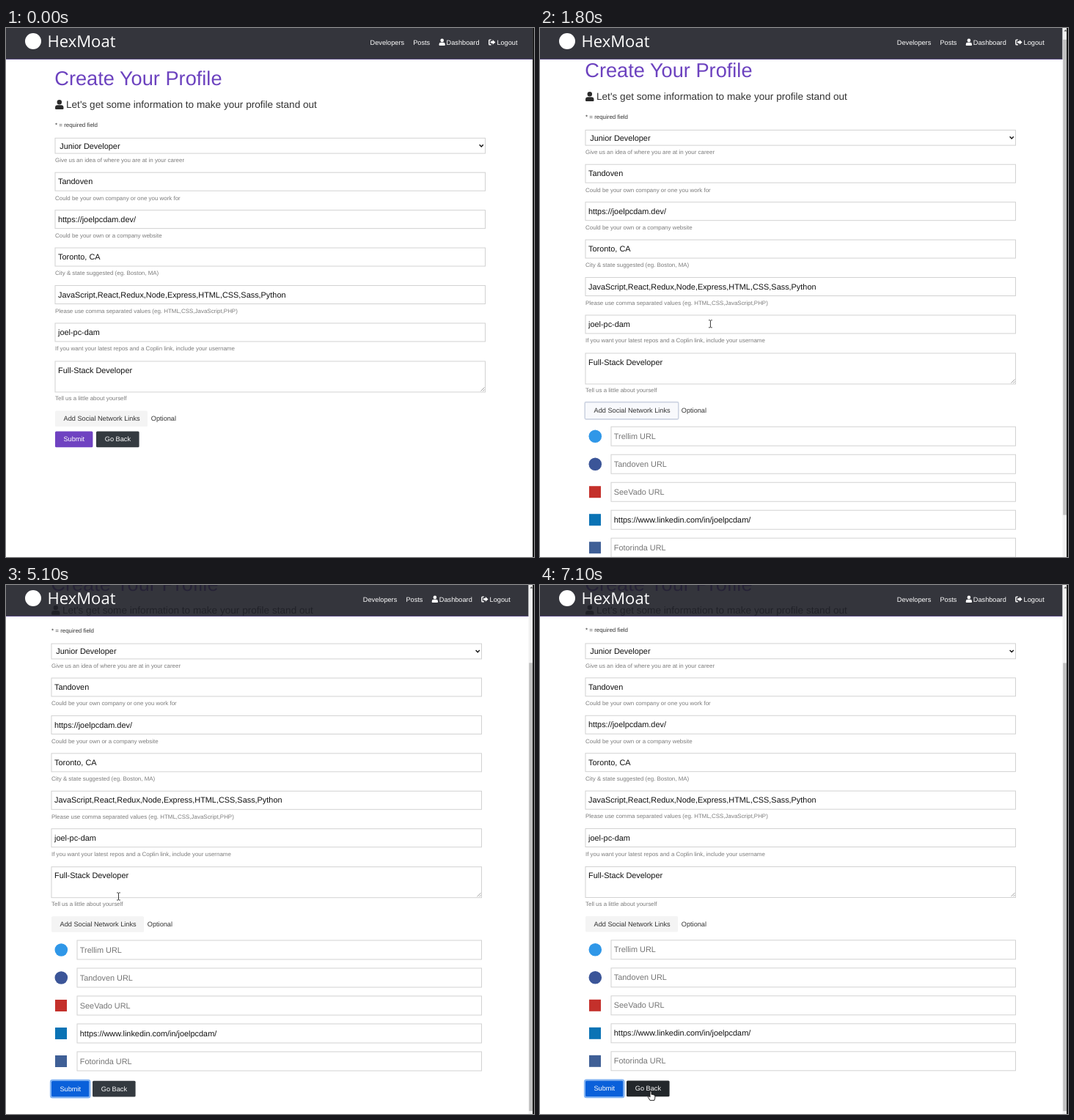
These frames come from a looping animation (720 px wide and 722 px high, 7.2 s). An HTML page:

```html
<!DOCTYPE html>
<html lang="en">
<head>
<meta charset="utf-8">
<title>Create Your Profile</title>
<style>
  html, body { margin: 0; width: 100%; height: 100%; overflow: hidden; background: #fff; }
  svg { display: block; font-family: "Liberation Sans", Arial, sans-serif; text-rendering: geometricPrecision; }
</style>
</head>
<body>
<svg id="stage" width="720" height="722" viewBox="0 0 720 722"></svg>
<script>
const LOOP = 7200, STEP = 100;
const ALERT_H = 48.2, LINKS_H = 196.4;
const VIEW_H = 722, PAGE_H = 792.4, TRACK_H = 712;

const text = (x, y, size, fill, str, extra = '') =>
  `<text x="${x}" y="${y}" font-size="${size}" fill="${fill}" ${extra}>${str}</text>`;
const rect = (x, y, w, h, fill, extra = '') =>
  `<rect x="${x}" y="${y}" width="${w}" height="${h}" fill="${fill}" ${extra}/>`;
const box = (x, y, w, h) => rect(x, y, w, h, '#fff', 'stroke="#d2d2d2"');
const hint = (y, str) => text(67, y, 7.95, '#7c7c7c', str);
const value = (x, y, str) => text(x, y, 10.9, '#111', str);
const icon = (x, y, scale, fill, d) =>
  `<path transform="translate(${x} ${y}) scale(${scale})" fill="${fill}" d="${d}"/>`;

const USER = 'M5.8 0a3.2 3.2 0 1 1 0 6.5a3.2 3.2 0 1 1 0-6.5zM3.4 7.3h4.7a3.4 3.4 0 0 1 3.4 3.4v1.1a1.2 1.2 0 0 1-1.2 1.2H1.2A1.2 1.2 0 0 1 0 11.8v-1.1a3.4 3.4 0 0 1 3.4-3.4z';
const EXIT = 'M3.6 0H1.5A1.5 1.5 0 0 0 0 1.5v5A1.5 1.5 0 0 0 1.5 8h2.1V6.6H1.5V1.4h2.1zM5.6.6v2H2.8v2.8h2.8v2L9.4 4z';

const fields = [
  ['Tandoven', 'Could be your own company or one you work for'],
  ['https://joelpcdam.dev/', 'Could be your own or a company website'],
  ['Toronto, CA', 'City &amp; state suggested (eg. Boston, MA)'],
  ['JavaScript,React,Redux,Node,Express,HTML,CSS,Sass,Python',
    'Please use comma separated values (eg. HTML,CSS,JavaScript,PHP)'],
  ['joel-pc-dam', 'If you want your latest repos and a Coplin link, include your username']
];

// label, badge colour, round badge, filled in
const links = [
  ['Trellim URL', '#2f97e8', true],
  ['Tandoven URL', '#3b5598', true],
  ['SeeVado URL', '#c4302b', false],
  ['https://www.linkedin.com/in/joelpcdam/', '#0a73b5', false, true],
  ['Fotorinda URL', '#3f5f96', false]
];

function fieldRow([val, note], i) {
  const mid = 209.7 + i * 51.43;
  return box(67, mid - 12.5, 586.5, 25) + value(71, mid + 3.7, val) + hint(mid + 24.9, note);
}

function linkRow([label, color, round, filled], i) {
  const mid = 568.2 + i * 38;
  const badge = round
    ? `<circle cx="80.3" cy="${mid}" r="8.8" fill="${color}"/>`
    : rect(72, mid - 8, 16, 16, color);
  return badge + box(102, mid - 13, 551.5, 26) +
    text(105.8, mid + 3.7, 10.9, filled ? '#111' : '#757575', label);
}

const form =
  `<g id="alert">${rect(67.3, 13.9, 586.4, 29, '#40ae5a', 'rx="1"')}` +
    `${text(75, 31.9, 9.1, '#fff', 'Profile Updated')}</g>` +
  text(66.3, 78.3, 27.2, '#6c42bf', 'Create Your Profile') +
  icon(67, 98, 1, '#2b2b2b', USER) +
  text(82, 109.3, 13.6, '#333', "Let's get some information to make your profile stand out") +
  text(67, 134.8, 7.95, '#333', '* = required field') +
  box(67, 150.3, 586.5, 20.8) + value(73.2, 164.5, 'Junior Developer') +
  '<path d="M645.6 159.3l2.6 2.6 2.6-2.6" fill="none" stroke="#111" stroke-width="1.4"/>' +
  hint(183.3, 'Give us an idea of where you are at in your career') +
  fields.map(fieldRow).join('') +
  box(67, 454.9, 586.5, 42) + value(71, 470.6, 'Full-Stack Developer') +
  '<path d="M647.5 495.5l5-5m-2 5l2-2" stroke="#888" stroke-width=".8"/>' +
  hint(508.4, 'Tell us a little about yourself') +
  '<rect id="add" rx="1.5" stroke-width="1.6"/>' +
  text(78.5, 536.2, 9.2, '#333', 'Add Social Network Links') +
  text(197.8, 536.2, 9.2, '#333', 'Optional') +
  `<g id="links">${links.map(linkRow).join('')}</g>` +
  '<g id="actions">' +
    rect(65.9, 549.5, 53.6, 23.8, 'none', 'id="ring" rx="2.5" stroke="#80b2f2" stroke-width="2"') +
    rect(67, 550.6, 51.4, 21.6, '#6f42c1', 'id="submit" rx="1.5"') +
    text(78.4, 564.4, 9.2, '#fff', 'Submit') +
    rect(123, 550.6, 58.6, 21.6, '#343a40', 'id="back" rx="1.5"') +
    text(134.8, 564.4, 9.2, '#fff', 'Go Back') +
  '</g>';

const header =
  '<rect id="bar" height="42.6" fill="rgb(31,32,39)" fill-opacity=".9"/>' +
  '<rect id="edge" y="42" height=".8" fill="#4b3a80"/>' +
  '<circle cx="37" cy="18" r="11" fill="#fff"/>' +
  text(56.6, 26, 22, '#fff', 'HexMoat', 'font-family="Open Sans, sans-serif"') +
  '<g id="nav">' +
    text(496.6, 22.8, 9.2, '#fff', 'Developers') +
    text(555.2, 22.8, 9.2, '#fff', 'Posts') +
    icon(590.5, 14.6, 0.72, '#fff', USER) +
    text(600.6, 22.8, 9.2, '#fff', 'Dashboard') +
    icon(658, 15.4, 1, '#fff', EXIT) +
    text(669.4, 22.8, 9.2, '#fff', 'Logout') +
  '</g>';

const cursors =
  '<g id="cursor">' +
    '<path id="arrow" d="M0 0v10l2.3-2.1 1.6 3.6 1.7-.8-1.6-3.4h3z" fill="#fff" stroke="#111" stroke-width=".9"/>' +
    '<path id="beam" d="M-2.4-5h1.6L0-4.4.8-5h1.6M0-4.4V4.4M-2.4 5h1.6L0 4.4.8 5h1.6" fill="none" stroke="#222" stroke-width=".9"/>' +
    '<path id="hand" d="M-1 .6Q0-.6 1 .6V4.6Q2.2 3.8 2.8 5Q4 4.4 4.4 5.5Q5.8 5 5.8 6.6V9.4L4.9 12.6H-1L-3.6 8.4Q-4 6.6-2.4 7.1L-1 8.3z" fill="#fff" stroke="#111" stroke-width=".9"/>' +
  '</g>';

document.getElementById('stage').innerHTML =
  rect(0, 0, 720, 722, '#fff') + `<g id="page">${form}</g>` + header +
  '<g id="scrollbar">' + rect(712.6, 0, 5.6, 722, '#f1f1f1') +
    '<path d="M714.6 4.4l2-2.4 1.6 2.4z" fill="#505050"/>' +
    '<rect id="thumb" x="713.2" width="5" fill="#c1c1c1"/></g>' +
  rect(718.2, 0, 1.8, 722, '#0b0b0b') + cursors;

const el = id => document.getElementById(id);
const set = (id, attrs) => {
  for (const k in attrs) el(id).setAttribute(k, attrs[k]);
};
const show = (id, on) => set(id, { display: on ? 'inline' : 'none' });
const move = (id, x, y) => set(id, { transform: `translate(${x} ${y})` });

// time, x, y, pointer used from this time on
const mouse = [
  [100, 420, 310, 'beam'], [400, 290, 430, 'beam'], [600, 180, 514, 'arrow'],
  [700, 142, 531, 'hand'], [1000, 138, 532, 'hand'], [1200, 160, 480, 'beam'],
  [1600, 225, 386, 'beam'], [1900, 235, 410, 'beam'], [2400, 258, 575, 'beam'],
  [2700, 252, 622, 'beam'], [3000, 212, 606, 'beam'], [3100, 212, 606, 'beam'],
  [3400, 172, 520, 'beam'], [3700, 104, 672, 'arrow'], [3800, 93, 684, 'hand'],
  [4700, 92, 685, 'hand'], [4900, 112, 600, 'beam'], [5300, 195, 250, 'beam'],
  [5500, 202.5, 226, 'beam'], [5900, 190, 236, 'arrow'], [6300, 165.5, 249.5, 'arrow'],
  [6600, 165.5, 249.5, 'arrow'], [6800, 158, 470, 'arrow'], [7000, 151, 690, 'hand'],
  [7200, 151, 691.5, 'hand']
];
const scrolls = [
  [0, 0], [1700, 0], [2100, 70.2], [4500, 70.2], [4500, 118.4], [5300, 118.4],
  [5500, 60.2], [5700, 0], [6600, 0], [7000, 118.6], [7200, 118.6]
];

const ease = u => u * u * (3 - 2 * u);

function sample(track, t) {
  let i = 0;
  while (i < track.length - 2 && t >= track[i + 1][0]) i++;
  const a = track[i], b = track[i + 1];
  const u = ease(Math.min(1, Math.max(0, (t - a[0]) / (b[0] - a[0]))));
  return a.map((v, k) => typeof v === 'number' ? v + (b[k] - v) * u : v);
}

function draw(now) {
  const t = Math.floor((now % LOOP) / STEP) * STEP;
  const open = t >= 900, alert = t >= 4500;
  const focusAdd = open && t < 4100, hoverAdd = t >= 700 && t < 1100;
  const hoverSubmit = t >= 3800 && t < 4800, pressed = t >= 4100;
  const scroll = sample(scrolls, t)[1];

  move('page', open ? -5 : 0, (alert ? ALERT_H : 0) - scroll);
  move('nav', open ? -9.8 : 0, 0);
  move('actions', 0, open ? LINKS_H : 0);
  const barW = open ? 712.6 : 718.2;
  set('bar', { width: barW });
  set('edge', { width: barW });

  show('alert', alert);
  show('links', open);
  show('scrollbar', open);
  const ratio = TRACK_H / (PAGE_H + (alert ? ALERT_H : 0));
  set('thumb', { y: 6 + scroll * ratio, height: VIEW_H * ratio });

  const grow = focusAdd ? 0.8 : 0;
  set('add', {
    x: 67 - grow, y: 522.4 - grow, width: 126 + 2 * grow, height: 21.6 + 2 * grow,
    fill: hoverAdd ? '#e8ebee' : focusAdd ? '#f8f9fc' : '#f4f4f4',
    stroke: focusAdd ? '#cdd4e2' : 'none'
  });
  show('ring', pressed);
  set('submit', { fill: hoverSubmit ? '#3b7fdb' : pressed ? '#0a60da' : '#6f42c1' });
  set('back', { fill: t >= 7000 ? '#23272b' : '#343a40' });

  const [, x, y, kind] = sample(mouse, t);
  show('cursor', t >= 100);
  move('cursor', x, y);
  for (const k of ['arrow', 'beam', 'hand']) show(k, k === kind);
}

const start = performance.now();
function tick() {
  draw(performance.now() - start);
  requestAnimationFrame(tick);
}
draw(0);
requestAnimationFrame(tick);
</script>
</body>
</html>
```
